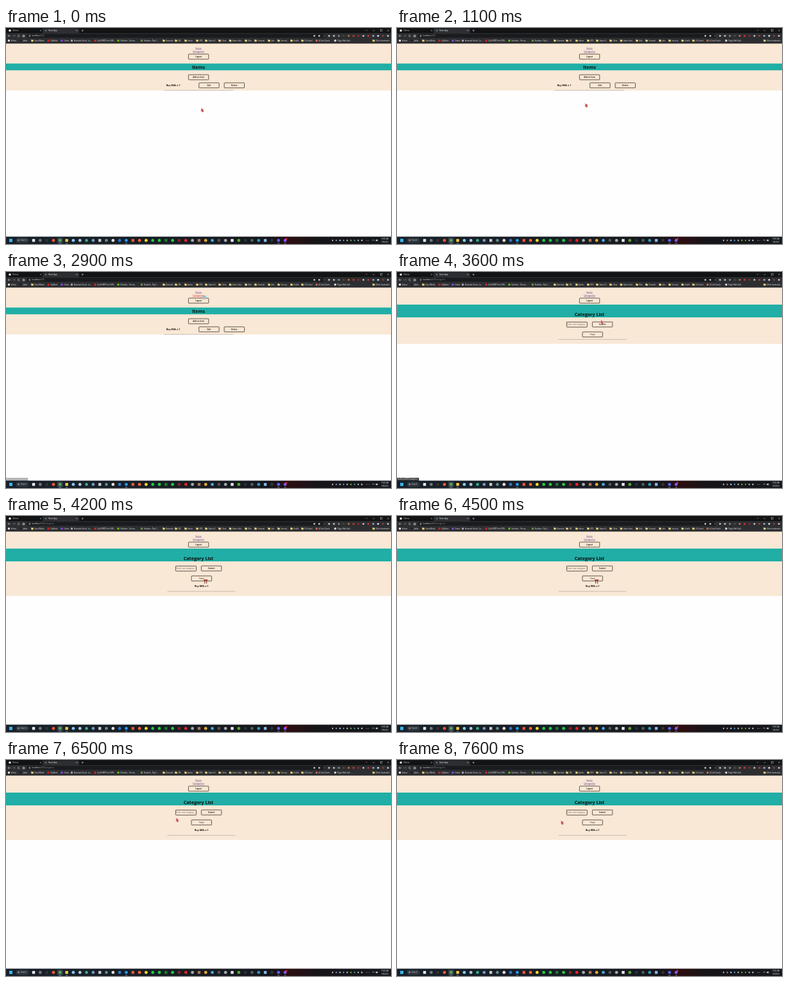
Animation, 600 px wide and 338 px high, one loop 8000 ms. Source, as an HTML page with a canvas:

```html
<!DOCTYPE html>
<html lang="en">
<head>
<meta charset="utf-8">
<title>Item list demo</title>
<style>
html, body { margin: 0; width: 100%; height: 100%; overflow: hidden; background: #fff; }
canvas { display: block; width: 600px; height: 338px; }
</style>
</head>
<body>
<canvas id="stage" width="600" height="338"></canvas>
<script>
const ctx = document.getElementById('stage').getContext('2d');
const LOOP = 8000, STEP = 100;
const FONT = '"Open Sans", "Noto Sans", sans-serif';
const CREAM = '#f8e8d5', TEAL = '#20aea6', INK = '#15110e', LINK = '#6a3c8c';

// Pointer path: time, x, y
const path = [
  [0, 306, 128.5], [900, 306, 128.5], [1500, 264, 100], [1800, 264, 100],
  [2100, 351.5, 77], [2600, 309, 40], [3100, 309, 40], [3600, 319.5, 78.5],
  [4000, 311, 102], [4600, 311, 102], [5000, 320, 119], [5500, 309, 119],
  [5600, 290, 116], [5900, 290, 116], [6500, 267, 94], [6600, 267, 94],
  [7100, 257.5, 98]
];

const bookmarks = [
  [4.5, 'Velmor', '#eee'], [23, 'Jubbo', '#222'], [41, 'Social Media', 'dir'],
  [66, 'ClipNook', '#f01818'], [87, 'Strimo', '#9147ff'],
  [102.5, 'Bramvale School - Lo...', '#aaa'], [139, 'QuikTMR® Free TMR...', '#d22'],
  [175, 'Parlimbo - The wo...', '#58cc02'], [211.5, 'Rookden - Play C...', '#6f9a3c'],
  [246, 'Bramvale', 'dir'], [265, 'ZKC', 'dir'], [280, 'Anime', 'dir'],
  [298, 'RPG', 'dir'], [312, 'Skarnel 2', 'dir'], [333, 'China', 'dir'],
  [349.5, 'Game Links', 'dir'], [374, 'Misc', 'dir'], [389, 'Financial', 'dir'],
  [410, 'Jobs', 'dir'], [425, 'Security', 'dir'], [445, 'Health', 'dir'],
  [462, 'UX School', 'dir'], [484, 'A Calm Drizzle', '#d64'],
  [513, 'Plugin Web Stall...', '#ddd'], [573, 'Other bookmarks', 'dir']
];

const apps = ('eee 777 333 f53 5a5 fc4 8cf acd 3a8 79b ccc 688 edd 37c 29e e53 f63 fd2 ' +
  '2c4 2c4 273 2c4 822 e22 aaa a75 ea3 4ad 555 aaa eee 5a3 234 465 39b 8be 333 56e 85f').split(' ');
const tools = 'ccc ccc 444 ccc ccc 999 454 d74 e33 a22 ccc d33 9bd eee 844 ccc'.split(' ');
const tray = 'ccc 9ad eee 5ae ddd 8c4 4b6 ccc eee'.split(' ');

function rect(x, y, w, h, color) {
  ctx.fillStyle = color;
  ctx.fillRect(x, y, w, h);
}

function dot(x, y, r, color) {
  ctx.fillStyle = color;
  ctx.beginPath();
  ctx.arc(x, y, r, 0, 7);
  ctx.fill();
}

function round(x, y, w, h, r, color) {
  ctx.fillStyle = color;
  ctx.beginPath();
  ctx.roundRect(x, y, w, h, r);
  ctx.fill();
}

function line(points, color, width = 0.6) {
  ctx.strokeStyle = color;
  ctx.lineWidth = width;
  ctx.beginPath();
  points.forEach(([x, y]) => ctx.lineTo(x, y));
  ctx.stroke();
}

// Tiny text is set large and scaled down to keep true proportions.
function text(str, x, y, size, color, { align = 'left', weight = 400 } = {}) {
  ctx.save();
  ctx.translate(x, y);
  ctx.scale(0.1, 0.1);
  ctx.font = `${weight} ${size * 10}px ${FONT}`;
  ctx.textAlign = align;
  ctx.textBaseline = 'alphabetic';
  ctx.fillStyle = color;
  ctx.fillText(str, 0, size * 3.6);
  const w = ctx.measureText(str).width / 10;
  ctx.restore();
  return w;
}

function cross(x, y, r, color) {
  line([[x - r, y - r], [x + r, y + r]], color, 0.5);
  line([[x - r, y + r], [x + r, y - r]], color, 0.5);
}

function folder(x, y) {
  rect(x - 1.7, y - 1.7, 1.7, 1, '#e8bd4e');
  rect(x - 1.7, y - 1.2, 3.4, 2.7, '#f5d67b');
}

function drawBrowser(url) {
  rect(0, 0, 600, 24.4, '#2d2e31');
  rect(0, 0, 600, 8, '#121314');
  round(57, 0.8, 57, 8, [2, 2, 0, 0], '#2d2e31');
  dot(6, 4, 1.8, '#eee');
  text('Velmor', 10, 4, 2.9, '#ccc');
  cross(54, 4, 0.9, '#bbb');
  dot(62, 4, 1.2, '#4c8794');
  text('React App', 66, 4, 2.9, '#eee');
  cross(110.3, 4, 0.9, '#ddd');
  line([[117.7, 4], [120.7, 4]], '#ddd');
  line([[119.2, 2.5], [119.2, 5.5]], '#ddd');
  line([[560.5, 3], [562, 4.3], [563.5, 3]], '#aaa', 0.5);
  line([[571.5, 4], [574.5, 4]], '#ccc', 0.5);
  ctx.strokeRect(583.5, 2.5, 2.6, 2.6);
  cross(595.5, 3.8, 1.3, '#ccc');

  for (const [x, d] of [[5, 1], [12.3, -1]]) {
    const c = d > 0 ? '#ddd' : '#777';
    line([[x - 2, 12.3], [x + 2, 12.3]], c);
    line([[x - d * 0.3, 10.7], [x - d * 2, 12.3], [x - d * 0.3, 13.9]], c);
  }
  ctx.strokeStyle = '#ddd';
  ctx.lineWidth = 0.6;
  ctx.beginPath();
  ctx.arc(20, 12.3, 1.5, 0.4, 5.6);
  ctx.stroke();
  line([[25.6, 12.3], [27.5, 10.6], [29.4, 12.3]], '#ddd');
  ctx.strokeRect(26.2, 12, 2.6, 1.9);

  round(32.5, 9.3, 465, 6, 3, '#1a1b1e');
  ctx.strokeStyle = '#bbb';
  ctx.strokeRect(36, 11.1, 1.7, 2.2);
  const w = text('localhost', 40.5, 12.4, 2.9, '#eee');
  text(url, 40.5 + w, 12.4, 2.9, '#8d8d91');
  tools.forEach((c, i) => dot(480.5 + i * 7.65, 12.3, 1.4, '#' + c));

  for (const [x, label, color] of bookmarks) {
    if (color === 'dir') folder(x, 19.8);
    else dot(x, 19.8, 1.7, color);
    text(label, x + 3.3, 19.8, 2.6, '#f0f0f0');
  }
}

function drawTaskbar() {
  const bg = ctx.createLinearGradient(0, 0, 600, 0);
  [[0, '#17212a'], [0.55, '#171b22'], [0.69, '#16151b'], [0.74, '#2b0e10'],
   [0.8, '#171418'], [1, '#15191f']].forEach(([p, c]) => bg.addColorStop(p, c));
  rect(0, 326.5, 600, 11.5, bg);
  rect(5, 329.9, 5, 5, '#39b5ee');
  round(15.5, 328.6, 20, 7.6, 3.5, '#30363e');
  ctx.strokeStyle = '#ddd';
  ctx.lineWidth = 0.6;
  ctx.beginPath();
  ctx.arc(19.6, 332.2, 1.1, 0, 7);
  ctx.stroke();
  text('Search', 23, 332.4, 2.7, '#ddd');
  round(79.8, 328, 9, 9, 1.5, '#36404a');
  apps.forEach((c, i) => {
    const x = 43 + i * 10.316;
    if (i % 5 === 0) rect(x - 2.2, 330.2, 4.4, 4.4, '#' + c);
    else dot(x, 332.4, 2.4, '#' + c);
    if (i === 4 || i === 5 || i === 14 || i > 36) rect(x - 1.5, 336.7, 3, 0.7, '#8fb3c8');
  });
  dot(437, 330, 1.3, '#e33');
  tray.forEach((c, i) => dot(509 + i * 5.7, 332.4, 1.1, '#' + c));
  text('ENG', 563.5, 332.4, 2.5, '#ddd', { align: 'center' });
  line([[570.6, 333], [572.3, 331], [574, 333]], '#ddd');
  rect(576.3, 331.2, 3, 2.2, '#ccc');
  text('10:06 AM', 596, 330.4, 2.6, '#eee', { align: 'right' });
  text('5/8/2023', 596, 334.6, 2.6, '#eee', { align: 'right' });
}

function box(x, y, w, h) {
  ctx.strokeStyle = '#3c332d';
  ctx.lineWidth = 0.8;
  ctx.beginPath();
  ctx.roundRect(x, y, w, h, 0.7);
  ctx.stroke();
}

function button(label, x, y, weight = 600) {
  box(x, y, 31.4, 7.9);
  text(label, x + 15.7, y + 4.1, 3.05, INK, { align: 'center', weight });
}

function link(label, y, color) {
  const w = text(label, 300, y, 3.6, color, { align: 'center' });
  rect(300 - w / 2, y + 1.8, w, 0.4, color);
}

function header(title, top, height, y) {
  rect(0, top, 600, height, TEAL);
  text(title, 300, y, 7.1, '#0c0c0c', { align: 'center', weight: 700 });
}

function rule(x, y, w) {
  rect(x, y, w, 0.6, '#a9a098');
}

function drawItems() {
  rect(0, 24, 600, 73.8, CREAM);
  header('Items', 55.6, 10.6, 61.7);
  button('Add an Item', 284.4, 73.1);
  text('Buy Milk x 1', 249.7, 89.6, 3.6, INK, { weight: 700 });
  button('Edit', 300.7, 85.8);
  button('Delete', 340.1, 85.8);
  rule(246, 97.5, 108);
}

function drawCategories(open) {
  rect(0, 24, 600, open ? 101 : 88.5, CREAM);
  header('Category List', 51, 20, 66.6);
  box(264.4, 78.3, 32, 7.9);
  text('Enter new category...', 265.2, 82.3, 3.05, '#6b625b');
  button('Submit', 304.4, 78.1);
  button('Food', 289, 93.8, 400);
  if (open) text('Buy Milk x 1', 304.7, 110.2, 3.6, INK, { align: 'center', weight: 700 });
  rule(251.5, open ? 117.7 : 105.3, 106);
}

function drawStatus(alpha) {
  ctx.globalAlpha = alpha;
  round(0, 322, 34.3, 5, [0, 1, 0, 0], '#3b3c3f');
  text('localhost:4000/categories', 1, 324.4, 2.6, '#eee');
  ctx.globalAlpha = 1;
}

function pointerAt(t) {
  let i = 0;
  while (i < path.length - 2 && t >= path[i + 1][0]) i++;
  const [t0, x0, y0] = path[i], [t1, x1, y1] = path[i + 1];
  const p = Math.min(1, (t - t0) / (t1 - t0));
  const e = p * p * (3 - 2 * p);
  return [x0 + (x1 - x0) * e, y0 + (y1 - y0) * e];
}

function drawArrow(x, y) {
  dot(x, y + 0.6, 2.6, '#eeb4ab');
  line([[x - 1.6, y - 3], [x - 0.5, y - 1]], '#6a4a48', 0.8);
  dot(x - 0.2, y - 0.1, 1.4, '#c9383a');
  dot(x + 0.5, y + 2, 0.9, '#8c3a38');
}

function drawGate(x, y, bar, legs) {
  rect(x - 3, y - 2.7, 6.2, 1.4, bar);
  rect(x - 2, y - 0.6, 4.2, 0.7, bar);
  rect(x - 1.8, y - 1.5, 1, 5.2, legs);
  rect(x + 1.1, y - 1.5, 1, 5.2, legs);
}

function draw(t) {
  const categories = t >= 3200;
  const hover = t >= 2600 && t < 3200;
  rect(0, 0, 600, 338, '#fefefe');
  if (categories) drawCategories(t >= 4200);
  else drawItems();
  link('Items', 31.8, LINK);
  link('Categories', 36.9, hover ? '#e5322d' : LINK);
  button('Logout', 284.4, 40.9);
  drawBrowser(categories ? ':4000/categories' : ':4000');
  if (t >= 2800 && t < 3700) drawStatus(Math.min(1, (t - 2700) / 500));
  drawTaskbar();

  const [x, y] = pointerAt(t);
  if (hover) drawGate(x, y, '#5cbcec', '#a9cfe0');
  else if (t >= 3900 && t < 4700) drawGate(x, y, '#b52c25', '#713029');
  else drawArrow(x, y);
}

function frame(now) {
  draw(Math.floor((now % LOOP) / STEP) * STEP);
  requestAnimationFrame(frame);
}
requestAnimationFrame(frame);
</script>
</body>
</html>
```
